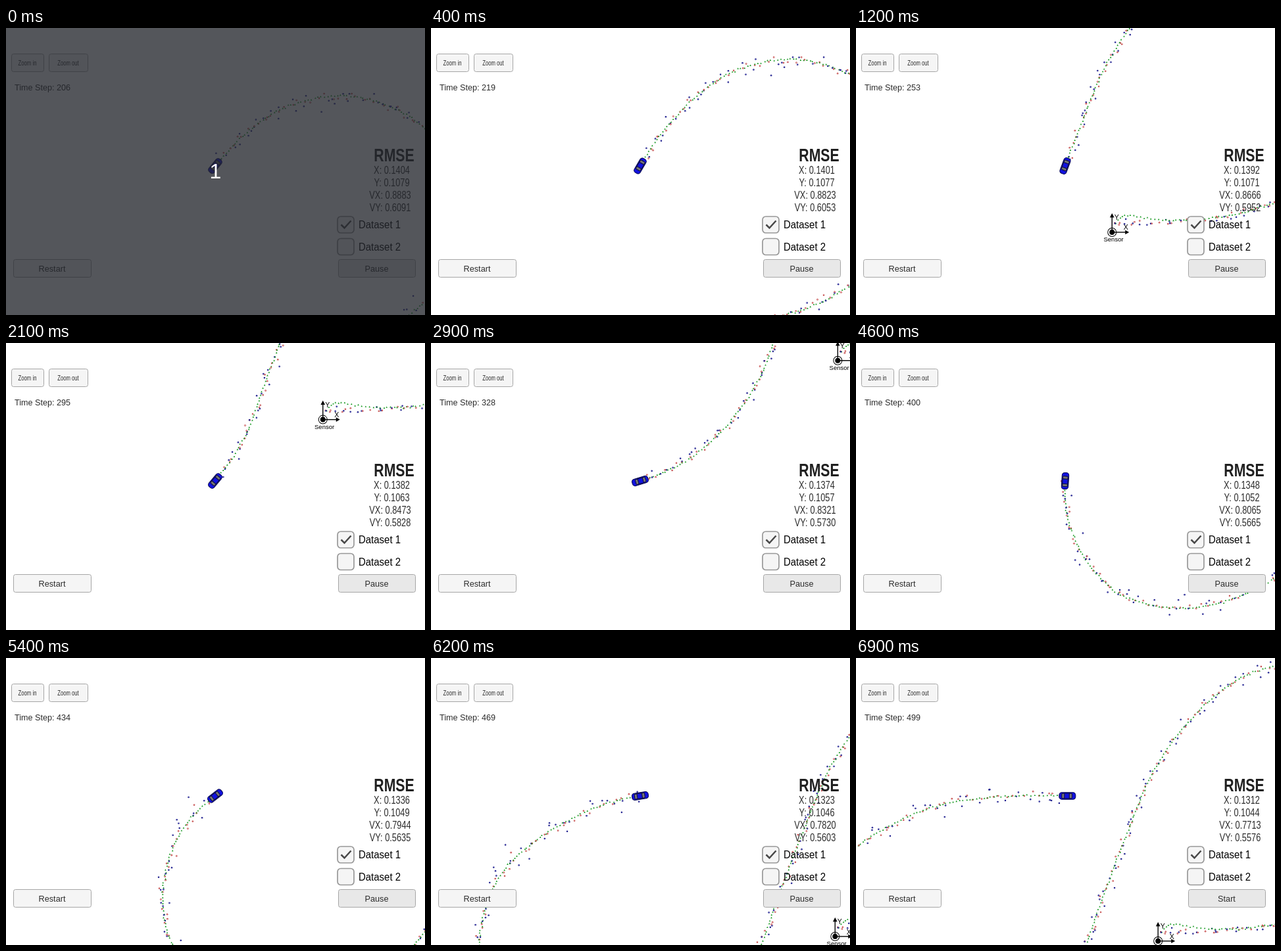
Recreate the animation shown at these times as an HTML page with a canvas. Size 637 by 437 pixels, loop 8800 ms.

```html
<!DOCTYPE html>
<html lang="en">
<head>
<meta charset="utf-8">
<title>Tracking simulator</title>
<style>
  html, body { margin: 0; width: 100%; height: 100%; overflow: hidden; background: #fff; }
  canvas { display: block; }
</style>
</head>
<body>
<canvas id="stage" width="637" height="437"></canvas>
<script>
const W = 637, H = 437, LOOP = 8800, TICK = 100;
const CENTER = { x: 318, y: 210 };
const FINAL_STEP = 499;
const INK = '#2c2c2c';
const ctx = document.getElementById('stage').getContext('2d');

// Simulation step reached at a time in ms.
const PACE = [[100, 206], [1200, 253], [2100, 295], [2900, 328], [3900, 371], [5400, 434], [6900, FINAL_STEP]];

// Errors at the start, midway and at the end, by step.
const ERRORS = {
  X: [[206, .1404], [328, .1374], [FINAL_STEP, .1312]],
  Y: [[206, .1079], [328, .1057], [FINAL_STEP, .1044]],
  VX: [[206, .8883], [328, .8321], [FINAL_STEP, .7713]],
  VY: [[206, .6091], [328, .5730], [FINAL_STEP, .5576]]
};

// The car passes one waypoint every WAYPOINT_STEPS; pixels from the sensor.
const WAYPOINT_STEPS = 20;
const WAYPOINTS = [
  [6, -13], [103, -16], [202, -31], [295, -68], [371, -134], [412, -226], [394, -324],
  [324, -396], [229, -425], [131, -403], [53, -341], [-7, -258], [-47, -164], [-84, -67],
  [-120, 29], [-181, 112], [-262, 169], [-361, 193], [-459, 169], [-523, 94], [-540, -1],
  [-509, -93], [-436, -159], [-342, -204], [-239, -220], [-135, -221]
];

const lerp = (a, b, k) => a + (b - a) * k;
const clamp = (value, low, high) => Math.max(low, Math.min(high, value));

function interpolate(keys, at) {
  const i = Math.max(1, keys.findIndex(([key]) => key >= at));
  const [from, a] = keys[i - 1], [to, b] = keys[i];
  return lerp(a, b, clamp((at - from) / (to - from), 0, 1));
}

function spline(a, b, c, d, k) {
  return .5 * (2 * b + (c - a) * k + (2 * a - 5 * b + 4 * c - d) * k * k
    + (3 * b - a - 3 * c + d) * k * k * k);
}

function positionAt(step) {
  const last = WAYPOINTS.length - 1, i = Math.floor(step / WAYPOINT_STEPS);
  const near = [-1, 0, 1, 2].map(n => WAYPOINTS[clamp(i + n, 0, last)]);
  const [x, y] = [0, 1].map(axis => spline(...near.map(p => p[axis]), step / WAYPOINT_STEPS - i));
  return { x, y };
}

let seed = 20;
function random() {
  seed = (seed * 16807) % 2147483647;
  return seed / 2147483647;
}
const gauss = () => Math.sqrt(-2 * Math.log(random())) * Math.cos(2 * Math.PI * random());

// Lidar and radar take turns; the first estimates drift upwards, then settle.
const readings = Array.from({ length: FINAL_STEP + 1 }, (_, step) => {
  const { x, y } = positionAt(step), lidar = step % 2 === 0;
  const bearing = Math.atan2(y, x);
  const along = gauss() * 5.5, across = gauss() * (1.5 + Math.hypot(x, y) * .02);
  const drift = 12 * (step / 5) * Math.exp(1 - step / 5);
  return {
    lidar,
    x: x + (lidar ? gauss() * 3 : along * Math.cos(bearing) - across * Math.sin(bearing)),
    y: y + (lidar ? gauss() * 3 : along * Math.sin(bearing) + across * Math.cos(bearing)),
    estimate: { x: x + gauss() * .7, y: y - drift + gauss() * .7 }
  };
});

function text(label, x, y, size, { color = INK, align = 'center', weight = '', squeeze = 1 } = {}) {
  ctx.save();
  ctx.translate(x, y);
  ctx.scale(squeeze, 1);
  ctx.font = `${weight} ${size}px "Liberation Sans", Arial, sans-serif`;
  ctx.textAlign = align;
  ctx.fillStyle = color;
  ctx.fillText(label, 0, 0);
  ctx.restore();
}

function box(x, y, w, h, radius, fill, stroke, width = 1) {
  ctx.beginPath();
  ctx.roundRect(x, y, w, h, radius);
  ctx.fillStyle = fill;
  ctx.fill();
  if (!stroke) return;
  ctx.strokeStyle = stroke;
  ctx.lineWidth = width;
  ctx.stroke();
}

function polygon(color, ...points) {
  ctx.beginPath();
  points.forEach(([x, y]) => ctx.lineTo(x, y));
  ctx.fillStyle = color;
  ctx.fill();
}

function line(color, width, ...points) {
  ctx.beginPath();
  points.forEach(([x, y]) => ctx.lineTo(x, y));
  ctx.strokeStyle = color;
  ctx.lineWidth = width;
  ctx.stroke();
}

function disc(x, y, radius, fill) {
  ctx.beginPath();
  ctx.arc(x, y, radius, 0, 2 * Math.PI);
  ctx.fillStyle = fill;
  ctx.fill();
}

function drawSensor() {
  disc(0, 0, 7, '#000');
  disc(0, 0, 6, '#fff');
  disc(0, 0, 4, '#000');
  line('#000', 1.4, [0, 0], [0, -24]);
  line('#000', 1.4, [0, 0], [22, 0]);
  polygon('#000', [0, -29], [3.3, -22.5], [-3.3, -22.5]);
  polygon('#000', [26, 0], [20, 3.3], [20, -3.3]);
  text('Y', 7, -19, 10.5, { color: '#000' });
  text('X', 21, -3.5, 10.5, { color: '#000' });
  text('Sensor', 2.3, 14, 9.5, { color: '#000' });
}

function drawTrail(step) {
  for (const { lidar, x, y, estimate: e } of readings.slice(0, step + 1)) {
    disc(x, y, 1.25, lidar ? '#b82020' : '#000078');
    disc(x, y, .6, lidar ? '#fff' : '#9090e0');
    polygon('#10961a', [e.x, e.y - 1.4], [e.x + 1.3, e.y + 1], [e.x - 1.3, e.y + 1]);
  }
}

function drawCar(step) {
  const { x, y } = positionAt(step), behind = positionAt(step - 1);
  ctx.save();
  ctx.translate(x, y);
  ctx.rotate(Math.atan2(y - behind.y, x - behind.x));
  box(-12.5, -5.2, 25, 10.4, 4, '#1212e0', '#08084c');
  for (const glass of [-8.5, 3]) box(glass, -3.8, 4, 7.6, 1, '#74747c', '#101030');
  for (const side of [-4, 4]) line('#101030', 1, [-5, side], [4, side]);
  ctx.restore();
}

// The camera stops one step short of the car.
function drawWorld(step) {
  const camera = positionAt(Math.min(step, FINAL_STEP - 1));
  ctx.save();
  ctx.translate(CENTER.x - camera.x, CENTER.y - camera.y);
  drawSensor();
  drawTrail(step);
  drawCar(step);
  ctx.restore();
}

function drawButton(label, x, y, w, fill, size, squeeze) {
  box(x + .5, y + .5, w - 1, 27, 3, fill, '#a6a6a6');
  text(label, x + w / 2 - .5, y + (size < 12 ? 18 : 19), size, { squeeze });
}

function drawCheckbox(label, y, checked) {
  box(504, y + 1, 25, 25, 5, '#f5f5f5', '#989898', 1.7);
  if (checked) line('#484848', 2.5, [509.5, y + 13.5], [514.5, y + 18.5], [524.5, y + 7.5]);
  text(label, 536, y + 19, 16, { color: '#000', align: 'left', squeeze: .935 });
}

function drawPanel(step) {
  drawButton('Zoom in', 8, 39, 50, '#f5f5f5', 11, .7);
  drawButton('Zoom out', 65, 39, 60, '#f5f5f5', 11, .7);
  text(`Time Step: ${step}`, 13, 95, 13, { align: 'left', squeeze: .97 });
  text('RMSE', 590, 203, 28, { weight: 'bold', squeeze: .76, color: '#202020' });
  Object.entries(ERRORS).forEach(([name, keys], row) => {
    const value = interpolate(keys, step).toFixed(4);
    text(`${name}: ${value}`, row < 2 ? 586.5 : 584, 222 + row * 19, 16, { squeeze: .8 });
  });
  drawCheckbox('Dataset 1', 286, true);
  drawCheckbox('Dataset 2', 319.5, false);
  drawButton('Restart', 11, 352, 119, '#f5f5f5', 12.7);
  drawButton(step < FINAL_STEP ? 'Pause' : 'Start', 505, 352, 118, '#e8e8e8', 12.7);
}

function drawCountdown(tick) {
  const strength = Math.max(0, 1 - tick / 2);
  ctx.save();
  ctx.globalAlpha = .78 * strength;
  ctx.fillStyle = 'rgb(36, 39, 46)';
  ctx.fillRect(0, 0, W, H);
  ctx.globalAlpha = strength;
  text('1', 318.5, 229, 32, { color: '#fff' });
  ctx.restore();
}

function render() {
  const tick = Math.floor(performance.now() % LOOP / TICK);
  const step = Math.round(interpolate(PACE, Math.min(tick * TICK, PACE.at(-1)[0])));
  ctx.fillStyle = '#fff';
  ctx.fillRect(0, 0, W, H);
  drawWorld(step);
  drawPanel(step);
  drawCountdown(tick);
  requestAnimationFrame(render);
}
render();
</script>
</body>
</html>
```
